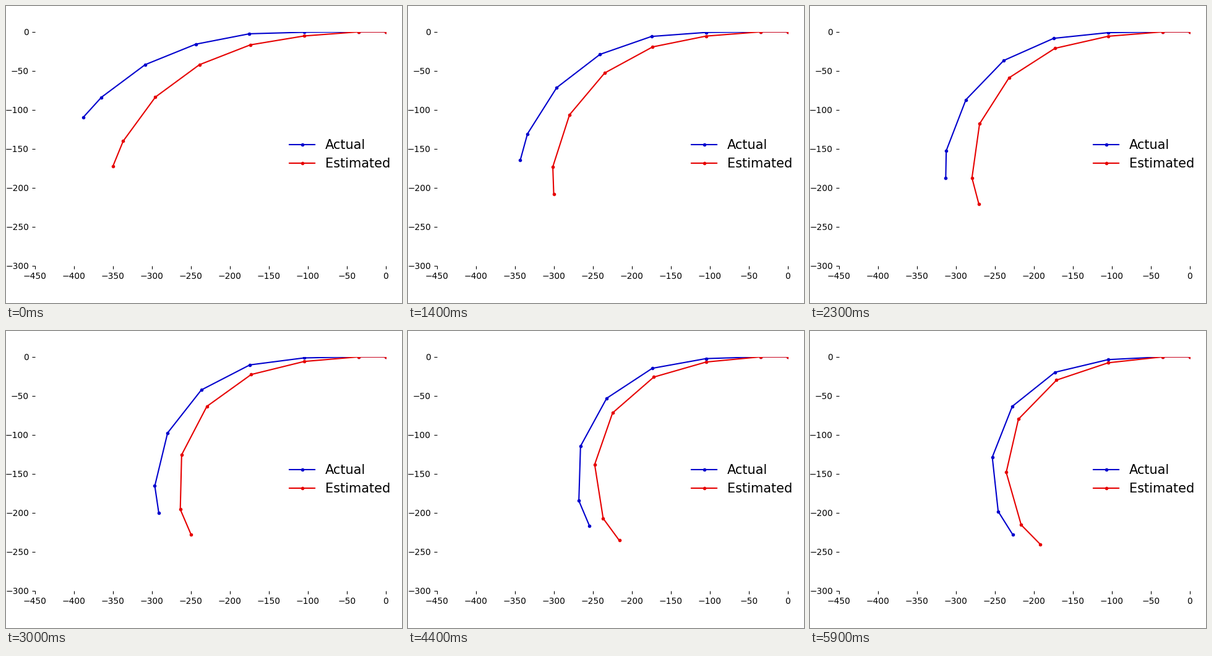
Write a matplotlib script that moves like this. It is 640 px wide and 480 px high and loops after 6000 ms.

```python
import numpy as np
import matplotlib.pyplot as plt
from matplotlib.animation import FuncAnimation

FRAMES, INTERVAL = 60, 100

# Chain from the fixed base on the right: half links at both ends.
LENGTHS = 70 * np.array([0.5, 1, 1, 1, 1, 1, 0.5])

# Links near the base speed up over time, links near the tip slow down.
EASE = 0.74 - 1.65 * 0.5 ** np.arange(6)


class Arm:
    """A chain that curls from one pose to another.

    A pose lists the headings of the moving links, in degrees below horizontal.
    """

    def __init__(self, ax, label, color, start, end):
        self.start, self.end = np.radians(start), np.radians(end)
        self.line, = ax.plot([], [], ".-", color=color, label=label)

    def pose(self, p):
        progress = p + EASE * p * (1 - p)
        headings = self.start + (self.end - self.start) * progress
        angles = np.append(0, headings)
        x = -np.cumsum(LENGTHS * np.cos(angles))
        y = -np.cumsum(LENGTHS * np.sin(angles))
        self.line.set_data(np.append(0, x), np.append(0, y))


fig, ax = plt.subplots(figsize=(6.4, 4.8), dpi=100)
fig.tight_layout()
ax.set_aspect("equal")
ax.set_xlim(-450, 0)
ax.set_ylim(-300, 0)
ax.set_xticks(range(-450, 1, 50))
ax.set_yticks(range(-300, 1, 50))
ax.spines[:].set_visible(False)

arms = [
    Arm(ax, "Actual", "#0000cd",
        start=[0.4, 1.6, 11.0, 22.0, 36.7, 47.8],
        end=[2.9, 13.4, 38.6, 68.5, 96.2, 122.1]),
    Arm(ax, "Estimated", "#e60000",
        start=[4.3, 9.4, 21.3, 36.3, 53.8, 67.8],
        end=[6.2, 18.5, 45.7, 77.1, 105.9, 134.5]),
]
fig.legend(loc="center right", fontsize=15, frameon=False)


def update(frame):
    for arm in arms:
        arm.pose(frame / (FRAMES - 1))
    return [arm.line for arm in arms]


anim = FuncAnimation(fig, update, frames=FRAMES, interval=INTERVAL,
                     repeat=True, repeat_delay=0)
plt.show()
```
